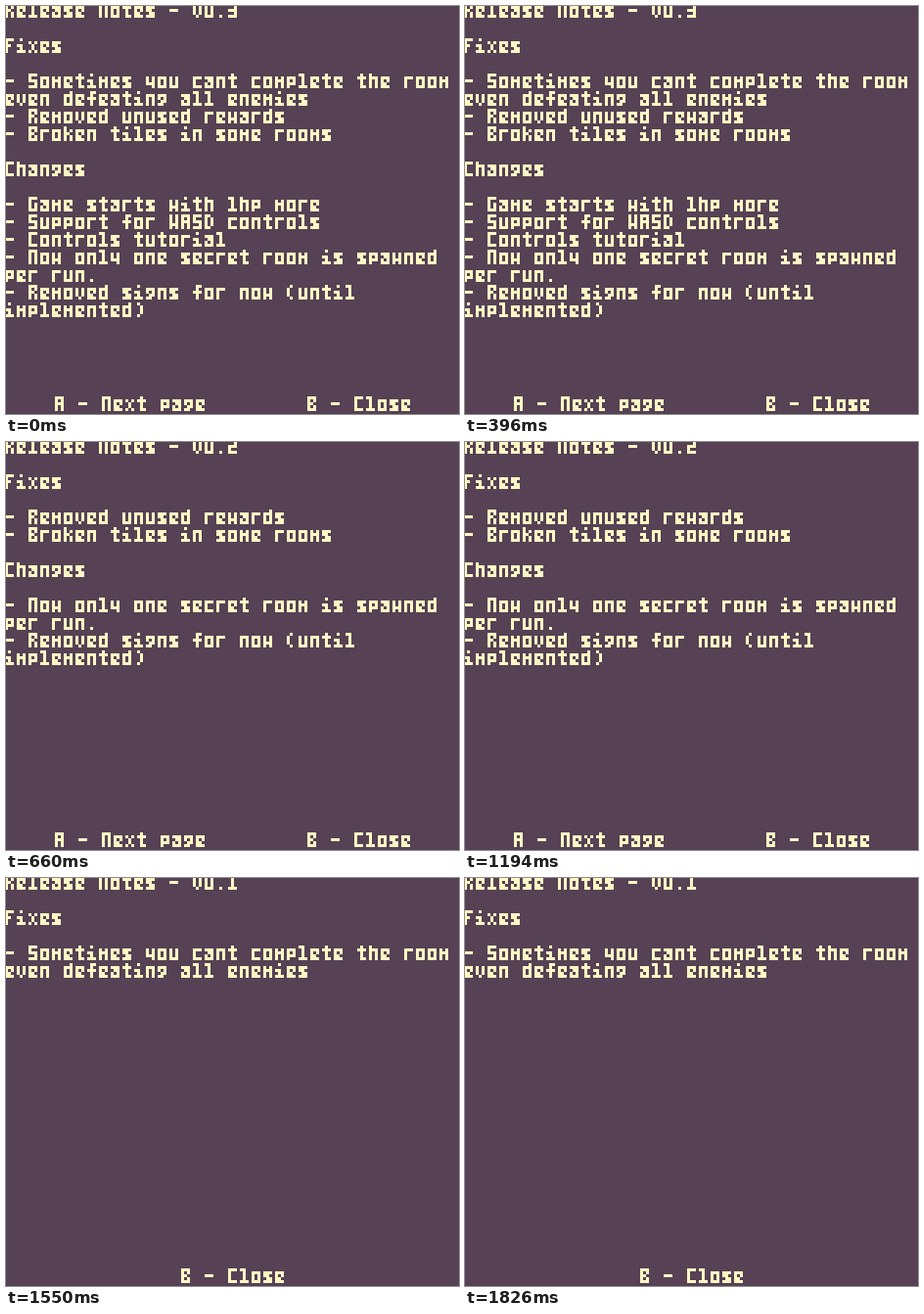
An HTML page for the animation above (2010 ms loop, 463x417 px).

```html
<!DOCTYPE html>
<html lang="en">
<head>
<meta charset="utf-8">
<title>Release notes</title>
<style>
  html, body { margin: 0; width: 100%; height: 100%; overflow: hidden; background: #574154; }
  svg { display: block; }
  path { fill: none; stroke: #fff7c4; stroke-linecap: square; }
</style>
</head>
<body>
<svg id="stage" width="463" height="417" viewBox="0 0 463 417" role="img" shape-rendering="crispEdges"></svg>
<script>
const NS = 'http://www.w3.org/2000/svg';
const stage = document.getElementById('stage');

// Pen strokes of a 3 by 5 lettering, one unit per pixel
const pen = {
  A: 'M0 4V0H2V4M0 2H2',
  B: 'M0 0H2V1M0 0V4H2V3M0 2H1',
  C: 'M2 0H0V4H2',
  D: 'M1 0H0V4H1M2 1V3',
  F: 'M2 0H0V4M0 2H1',
  G: 'M2 0H0V4H2V2',
  N: 'M0 4V0H2V4',
  R: 'M0 4V0H2V1M0 2H1M2 3V4',
  S: 'M2 0H0V2H2V4H0',
  V: 'M0 0V3M2 0V3M1 4h0',
  W: 'M0 0V4M2 0V4M0 3H2',
  a: 'M0 1H2V4H0V3M1 2H2',
  c: 'M2 1H0V4H2',
  d: 'M2 0V4H0V1H2',
  e: 'M2 2V1H0V4H2M0 3H1',
  f: 'M2 0H1V4M0 2H2',
  g: 'M0 2V1H2V3H1M0 4H1',
  h: 'M0 0V4M0 1H2V4',
  i: 'M1 0h0M0 2H1V4M0 4H2',
  k: 'M0 0V4M2 1h0M1 2h0M2 3V4',
  l: 'M0 0H1V4M0 4H2',
  m: 'M0 1V4M2 1V4M0 2H2',
  n: 'M0 4V1H2V4',
  o: 'M0 1H2V4H0Z',
  p: 'M0 4V1H2V3H0',
  r: 'M0 4V1H2',
  s: 'M2 1H0V2H1M1 3H2V4H0',
  t: 'M1 0V4H2M0 1H2',
  u: 'M0 1V4H2V1',
  v: 'M0 1V3M2 1V3M1 4h0',
  w: 'M0 1V4M2 1V4M0 3H2',
  x: 'M0 1h0M2 1h0M1 2V3M0 4h0M2 4h0',
  y: 'M0 1V3H2M2 1V4',
  0: 'M0 0H2V4H0Z',
  1: 'M0 0H1V4M0 4H2',
  2: 'M0 0H2V2H0V4H2',
  3: 'M0 0H2V4H0M0 2H2',
  '.': 'M1 4h0',
  '-': 'M0 2H2',
  '(': 'M1 0h0M0 1V3M1 4h0',
  ')': 'M1 0h0M2 1V3M1 4h0'
};

const stuck = '- Sometimes you cant complete the room\neven defeating all enemies';
const cleanup = '- Removed unused rewards\n- Broken tiles in some rooms';
const world = '- Now only one secret room is spawned\nper run.\n' +
  '- Removed signs for now (until\nimplemented)';
const extras = '- Game starts with 1hp more\n- Support for WASD controls\n- Controls tutorial';
const next = [['A - Next page', 17], ['B - Close', 103]];

const pages = [
  { ms: 660, keys: next,
    body: `Release Notes - V0.3\n\nFixes\n\n${stuck}\n${cleanup}\n\nChanges\n\n${extras}\n${world}` },
  { ms: 890, keys: next,
    body: `Release Notes - V0.2\n\nFixes\n\n${cleanup}\n\nChanges\n\n${world}` },
  { ms: 460, keys: [['B - Close', 60]],
    body: `Release Notes - V0.1\n\nFixes\n\n${stuck}` }
];
const loop = pages.reduce((sum, p) => sum + p.ms, 0);

function add(parent, tag, attrs) {
  const el = document.createElementNS(NS, tag);
  for (const key in attrs) el.setAttribute(key, attrs[key]);
  return parent.appendChild(el);
}

function write(parent, text, col, row) {
  [...text].forEach((ch, i) => {
    if (pen[ch]) add(parent, 'path', {
      d: pen[ch],
      transform: `translate(${col + i * 4 + 0.5} ${row + 0.5})`
    });
  });
}

add(stage, 'rect', { width: 463, height: 417, fill: '#574154' });
for (const page of pages) {
  page.el = add(stage, 'g', { transform: 'translate(-1 0) scale(3)', display: 'none' });
  page.body.split('\n').forEach((line, i) => write(page.el, line, 0, i * 6 - 1));
  for (const [label, col] of page.keys) write(page.el, label, col, 133);
}

let shown;
function draw(time) {
  let t = time % loop, i = 0;
  while (t >= pages[i].ms) t -= pages[i++].ms;
  if (pages[i] === shown) return;
  if (shown) shown.el.setAttribute('display', 'none');
  shown = pages[i];
  shown.el.removeAttribute('display');
  stage.setAttribute('aria-label', shown.body + '\n' + shown.keys.map(k => k[0]).join(', '));
}

const start = performance.now();
function tick() {
  draw(performance.now() - start);
  requestAnimationFrame(tick);
}
tick();
</script>
</body>
</html>
```
